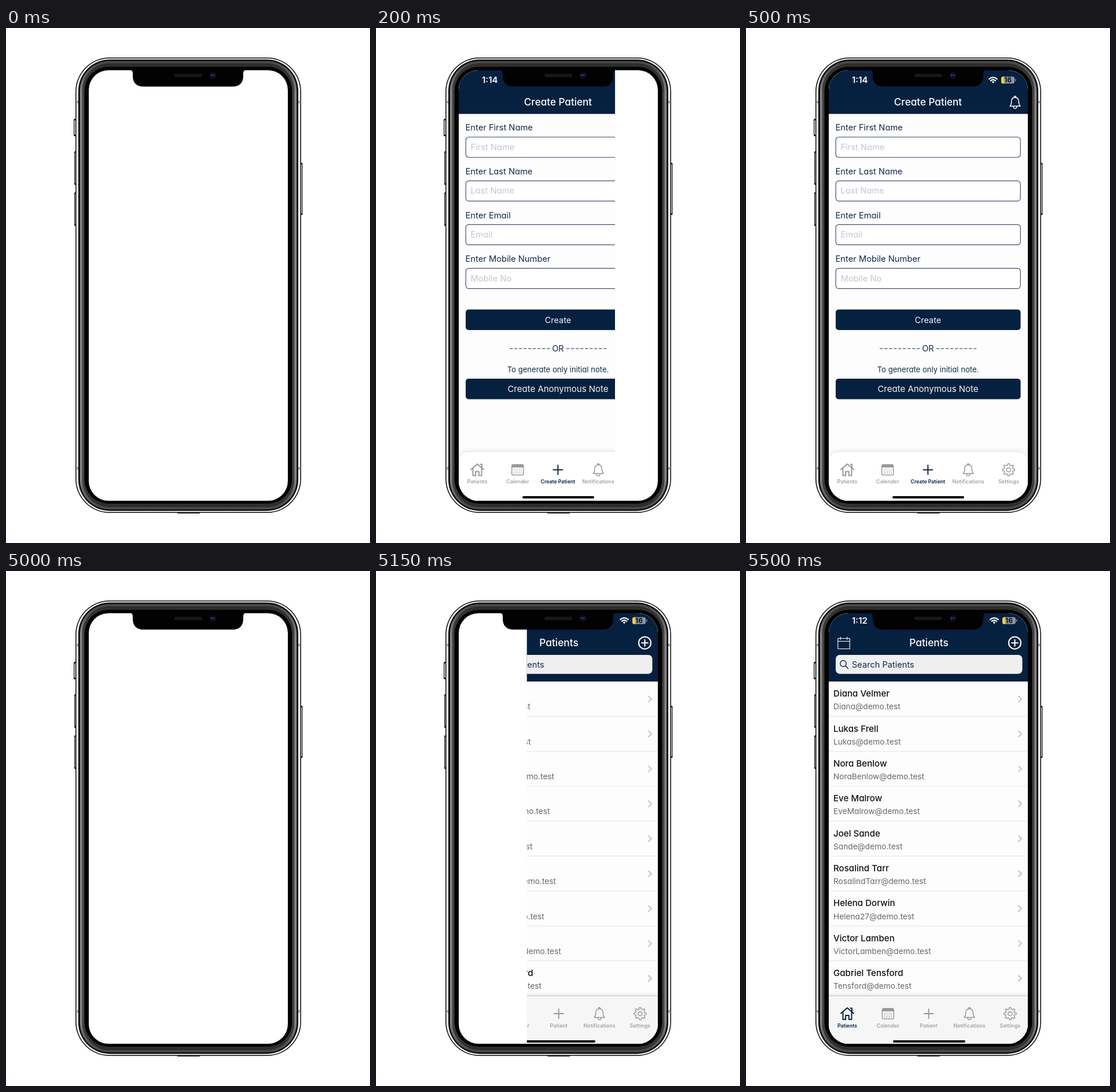
An HTML page for the animation above (8 s loop, 629 by 890 pixels).

```html
<!DOCTYPE html>
<html lang="en">
<head>
<meta charset="utf-8">
<title>Patient app</title>
<style>
  html, body { margin: 0; width: 100%; height: 100%; overflow: hidden; background: #fff; }
  svg { display: block; }
  text { font-family: Inter, "Open Sans", sans-serif; }
  .geo { font-feature-settings: "cv11"; }
  .mid { text-anchor: middle; }
  .line { fill: none; stroke: currentColor; stroke-linecap: round; stroke-linejoin: round; }
</style>
</head>
<body>
<svg id="stage" width="629" height="890" viewBox="0 0 629 890"></svg>
<script>
const NAVY = '#06203f', INK = '#14284b', GRAY = '#98989c';
const LOOP = 8000, STEP = 50, WIPE = 500, SECOND = 5000;

const rect = (x, y, w, h, r, fill, extra = '') =>
  `<rect x="${x}" y="${y}" width="${w}" height="${h}" rx="${r}" fill="${fill}" ${extra}/>`;
const text = (x, y, size, fill, str, cls = 'geo', weight = 400) =>
  `<text x="${x}" y="${y}" font-size="${size}" fill="${fill}" class="${cls}" font-weight="${weight}">${str}</text>`;
const line = (d, width = 1.5, extra = '') => `<path class="line" d="${d}" stroke-width="${width}" ${extra}/>`;
const at = (x, y, color, body) => `<g transform="translate(${x} ${y})" color="${color}">${body}</g>`;
const times = (n, f) => Array.from({ length: n }, (_, i) => f(i)).join('');

// Icons, each centred on 0,0
function gear() {
  const pts = times(96, i => {
    const a = i / 96 * 2 * Math.PI;
    const r = 9.2 + 1.5 * Math.tanh(2.2 * Math.cos(8 * a));
    return `${(r * Math.sin(a)).toFixed(2)},${(-r * Math.cos(a)).toFixed(2)} `;
  });
  return `<polygon class="line" points="${pts}" stroke-width="1.5"/><circle class="line" r="3.6" stroke-width="1.5"/>`;
}
const icons = {
  home: line('M-11-.5L0-10 11-.5M5.5-9.5H8V-3.5M-7.5-2V10H-2.8V3H2.8V10H7.5V-2', 2),
  calendar: `<rect class="line" x="-10" y="-9" width="20" height="18" rx="2.5" stroke-width="1.5"/>` +
    `<path d="M-10-4V-7Q-10-9-8-9H8Q10-9 10-7V-4Z" fill="currentColor"/>` +
    times(3, r => line(`M-6 ${-1 + r * 3.2}H6.5`, 1.6, 'stroke-dasharray="0 3"')),
  plus: line('M-8 0H8M0-8V8', 1.9),
  bell: line('M-9 6.5Q-6.3 4-6.3-1C-6.3-5.5-4-8.5 0-8.5S6.3-5.5 6.3-1Q6.3 4 9 6.5ZM-1.5-8.8Q-1.5-10.8 0-10.8T1.5-8.8M-3 7Q-2.7 10.6 0 10.6T3 7'),
  gear: gear(),
};

const wifi = line('M-6.8-1.8A9.8 9.8 0 0 1 6.8-1.8M-4.2 1.1A6 6 0 0 1 4.2 1.1', 2.2) +
  '<path d="M-2.4 3.1A3.4 3.4 0 0 1 2.4 3.1L0 5.6Z" fill="currentColor"/>';
const battery = rect(-12, -6, 23, 12, 3.5, '#8d96a1') +
  '<path d="M-7-6H-8.5Q-12-6-12-2.5V2.5Q-12 6-8.5 6H-7Z" fill="#f6cf35"/>' +
  rect(12, -2, 1.5, 4, .7, '#8d96a1') + text(-.5, 4.3, 12, '#0b1522', '16', 'mid', 700);

const status = (time, y, x) => text(183, y + 5, 15, '#fff', time, '', 600) +
  at(x, y, '#fff', wifi) + at(x + 26, y, '#fff', battery);

function tabs(y, first, gap, active, third) {
  const names = ['Patients', 'Calender', third, 'Notifications', 'Settings'];
  return Object.values(icons).map((icon, i) => {
    const on = i === active, color = on ? NAVY : GRAY, x = first + i * gap;
    return at(x, y, color, icon) + text(x, y + 23.5, on ? 8.7 : 9.1, color, names[i], 'mid', on ? 600 : 500);
  }).join('');
}

function createScreen() {
  const fields = [['First Name', 'First Name'], ['Last Name', 'Last Name'], ['Email', 'Email'], ['Mobile Number', 'Mobile No']];
  const form = fields.map(([label, hint], i) => {
    const y = i * 75.6;
    return text(154.5, 177.3 + y, 14.7, INK, 'Enter ' + label) +
      rect(155.2, 188.5 + y, 319, 35, 5, '#fff', 'stroke="#45506f" stroke-width="1.2"') +
      text(163.5, 210.8 + y, 14.7, '#c6c6ca', hint);
  }).join('');
  const dashes = x => line(`M${x} 554H${x + 70}`, 1.2, 'style="stroke-linecap:butt" stroke-dasharray="5.4 2.6"');
  return rect(140, 70, 350, 750, 0, '#fdfdfd') + rect(140, 70, 350, 78.5, 0, NAVY) +
    status('1:14', 90, 427) +
    text(314.5, 133.8, 17.1, '#fff', 'Create Patient', 'geo mid', 500) +
    at(465, 128.5, '#fff', icons.bell) + form +
    rect(155, 486.5, 319.5, 35.5, 5, NAVY) + text(314.5, 510, 14.4, '#f4f6f8', 'Create', 'mid') +
    `<g color="${INK}">${dashes(231)}${dashes(329)}</g>` +
    text(314.5, 558.7, 14.5, INK, 'OR', 'geo mid') +
    text(314.5, 594.6, 13.1, INK, 'To generate only initial note.', 'geo mid') +
    rect(155, 606, 319.5, 35.5, 5, NAVY) +
    text(314.5, 628.7, 15, '#f4f6f8', 'Create Anonymous Note', 'geo mid') +
    rect(143, 733, 344, 110, 17, '#fff', 'filter="url(#soft)"') +
    tabs(763.5, 175, 69.7, 2, 'Create Patient') + rect(253, 809, 124, 4, 2, '#000');
}

function listScreen() {
  const people = [
    ['Diana Velmer', 'Diana'], ['Lukas Frell', 'Lukas'], ['Nora Benlow', 'NoraBenlow'],
    ['Eve Malrow', 'EveMalrow'], ['Joel Sande', 'Sande'], ['Rosalind Tarr', 'RosalindTarr'],
    ['Helena Dorwin', 'Helena27'], ['Victor Lamben', 'VictorLamben'], ['Gabriel Tensford', 'Tensford'],
  ];
  const rows = people.map(([name, mail], i) => {
    const y = i * 60.35;
    return text(151, 217.2 + y, 15.1, '#111', name, 'geo', 500) +
      text(151, 239.4 + y, 13.7, '#686868', mail + '@demo.test') +
      at(473.5, 221.3 + y, '#b9b9bd', line('M-2.6-5L2.6 0-2.6 5', 1.6)) +
      rect(140, 250.7 + y, 350, 1, 0, '#e6e6e6');
  }).join('');
  return rect(140, 70, 350, 750, 0, '#fdfdfd') + rect(140, 70, 350, 121, 0, NAVY) +
    status('1:12', 85.7, 429) +
    at(168.8, 124.5, '#fff', line('M-10-8H10.5V10H-10ZM-10-3H10.5M-5.5-10.5V-6M6-10.5V-6', 1.1)) +
    text(316, 129.7, 17.3, '#fff', 'Patients', 'geo mid', 500) +
    at(464.5, 124.2, '#fff', '<circle class="line" r="10.5" stroke-width="2.1"/>' + line('M-5.5 0H5.5M0-5.5V5.5', 2.1)) +
    rect(155, 145, 322.5, 32.8, 7, '#efeff0') +
    at(168, 160, INK, '<circle class="line" r="5.2" stroke-width="1.5"/>' + line('M4 4L8.5 8.5', 1.6)) +
    text(183, 167, 14.6, INK, 'Search Patients', '') + rows +
    rect(140, 734.5, 350, 90, 0, '#f6f6f6', 'filter="url(#soft)"') + rect(140, 734, 350, 1, 0, '#d2d2d2') +
    tabs(765, 175, 70.35, 0, 'Patient') + rect(254, 811, 125, 4, 2, '#000');
}

function phone() {
  const shell = (dx, dy, r, fill) => rect(120 + dx, 51 + dy, 390 - 2 * dx, 787 - 2 * dy, r, fill);
  const button = (x, y, h) => rect(x, y, 6, h, 1.5, '#111') + rect(x + 1.2, y + 2.5, 3.6, h - 5, 1, '#e4e4e4');
  const bands = [128, 761].map(y => rect(121, y - 2, 4, 4, 0, '#999') + rect(505, y - 2, 4, 4, 0, '#999')).join('');
  return button(117, 157, 30) + button(118, 213, 58) + button(118, 284, 58) + button(506.5, 233, 90) +
    rect(296, 836, 39, 3, 1, '#222') +
    shell(0, 0, 59, '#0a0a0a') + shell(1.5, 1.4, 57.5, '#f4f4f4') + bands +
    shell(5, 3.6, 54, '#0c0c0c') + shell(7.8, 6, 51, 'url(#steel)') +
    shell(11.5, 10, 47, 'url(#steelDark)') + shell(15.5, 16, 42, '#000') +
    rect(143, 73, 344, 744, 34, '#fff');
}

const notch = '<path d="M213 72Q219 72.5 219 78V82Q219 101.3 238 101.3H391Q410 101.3 410 82V78Q410 72.5 416 72Z" fill="#020203"/>' +
  rect(291, 79, 48, 6, 3, '#17171a') +
  '<circle cx="357.5" cy="82" r="6" fill="#0b0e1c"/><circle cx="355.5" cy="81.5" r="1.5" fill="#2c479c"/><circle cx="359.2" cy="81.5" r="1.3" fill="#2c479c"/>';

const steel = (id, edge, side) => `<linearGradient id="${id}" x2="0" y2="1">` +
  [[0, edge], [.07, side], [.93, side], [1, edge]].map(([o, c]) => `<stop offset="${o}" stop-color="${c}"/>`).join('') +
  '</linearGradient>';

const stage = document.getElementById('stage');
stage.innerHTML = `<defs>${steel('steel', '#454545', '#858585')}${steel('steelDark', '#2c2c2c', '#434343')}
  <filter id="soft" x="-10%" y="-30%" width="120%" height="160%"><feDropShadow dx="0" dy="-1" stdDeviation="4" flood-opacity=".13"/></filter>
  <clipPath id="glass">${rect(143, 73, 344, 744, 34, '#000')}</clipPath>
  <clipPath id="wipe"><rect id="window" y="70" height="750"/></clipPath></defs>
  ${phone()}
  <g clip-path="url(#glass)"><g clip-path="url(#wipe)">
    <g id="create">${createScreen()}</g><g id="list">${listScreen()}</g>
  </g></g>${notch}`;

const [win, create, list] = ['window', 'create', 'list'].map(id => document.getElementById(id));
const start = performance.now();

function draw() {
  const t = (performance.now() - start) % LOOP;
  const second = t >= SECOND;
  const since = second ? t - SECOND : t;
  const p = Math.min(1, Math.floor(since / STEP) * STEP / WIPE);
  const shown = 1 - (1 - p) ** 3;
  const width = (second ? 352 : 344.5) * shown;
  win.setAttribute('x', second ? 492 - width : 143);
  win.setAttribute('width', width);
  create.style.display = second ? 'none' : '';
  list.style.display = second ? '' : 'none';
  requestAnimationFrame(draw);
}
draw();
</script>
</body>
</html>
```
